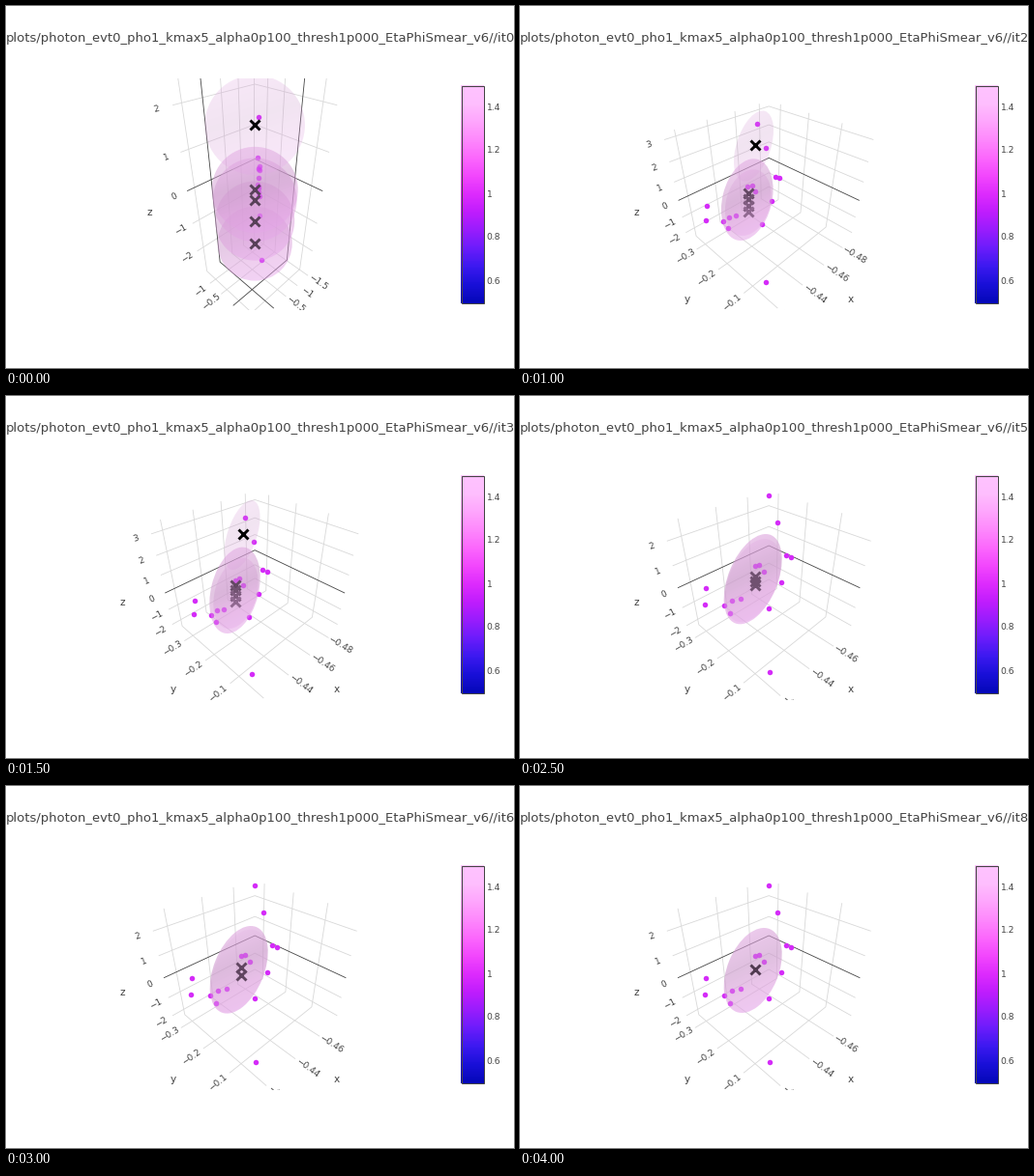
Recreate the animation shown at these times as a matplotlib script. Size 525 by 375 pixels, loop 4500 ms.

```python
from collections import namedtuple

import numpy as np
import matplotlib.pyplot as plt
from matplotlib.animation import FuncAnimation
from matplotlib.colors import LinearSegmentedColormap
from matplotlib.patches import Ellipse, Rectangle

W, H, DPI = 525, 375, 100
PX = 72 / DPI                       # points per pixel
INK, GRID, DOT = "#444444", "#d8d8d8", "#d42bf8"
PLUM = np.array([221, 160, 221]) / 255
LEFT, RIGHT, TOP, BOTTOM = 60, 454, 75, 315
CX, CY, FOCAL = 257.2, 195, 120 / np.tan(np.pi / 8)
EYE = 1.25 * 3 ** 0.5
STEPS = 9
TITLE = "plots/photon_evt0_pho1_kmax5_alpha0p100_thresh1p000_EtaPhiSmear_v6//it%d"

plt.rcParams["font.family"] = "DejaVu Sans"
BAR = LinearSegmentedColormap.from_list("bar", [
    "#0508b8", "#1910d8", "#3c19f0", "#6b1cfb", "#981cfd", "#bf1cfd", "#dd2bfd",
    "#f246fe", "#fc67fd", "#fe88fc", "#fea5fd", "#febefe", "#fec3fe"])
SHADE = LinearSegmentedColormap.from_list("shade", [
    (0, "#e2a8e2"), (0.42, "#cb97cb"), (0.72, "#dfa0df"), (1, "#e6a6ea")])


class Axis:
    """Ticks first, first + step, ... placed at start, start + gap, ..."""

    def __init__(self, first, step, count, start, gap):
        self.first, self.step, self.count = first, step, count
        self.start, self.gap = start, gap

    def place(self, value):
        return self.start + (value - self.first) / self.step * self.gap

    def value(self, place):
        return self.first + (place - self.start) / self.gap * self.step

    def ticks(self):
        for i in range(self.count):
            yield round(self.first + i * self.step, 3), self.start + i * self.gap


Scene = namedtuple("Scene", "half axes blobs marks")


def mix(a, b, u):
    return np.array(a) * (1 - u) + np.array(b) * u


def project(x, y, z):
    depth = EYE - (x + y + z) / 3 ** 0.5
    right = (y - x) / 2 ** 0.5
    up = (2 * z - x - y) / 6 ** 0.5
    return np.array([CX + FOCAL * right / depth, CY - FOCAL * up / depth])


def unproject(px, py, x):
    """Point of the plane x = const that is seen at (px, py)."""
    k = (px - CX) / FOCAL * 2 ** 0.5
    m = (py - CY) / FOCAL * 6 ** 0.5
    r = 3 ** 0.5
    depth = (EYE - r * x) / (1 - m / (2 * r) + k * r / 2)
    return x, x + k * depth, (2 * x + k * depth - m * depth) / 2


LATE_AXES = (Axis(-0.46, 0.02, 3, -0.25, 0.32), Axis(-0.3, 0.1, 3, -0.385, 0.315),
             Axis(-2, 1, 5, -0.436, 0.2015))


def cloud():
    seen = np.array([
        (257, 103), (266, 131), (274.5, 164.5), (279.5, 166.5), (269.5, 193), (191.7, 199),
        (191, 216.3), (211.5, 217), (219, 212), (227.5, 210.3), (217, 225), (256.5, 219.7),
        (242.5, 176.3), (247.5, 175), (251.5, 182), (258, 286.3)])
    px, py = seen.T
    depth = np.clip(0.0077 * (CX - px) + 0.004 * (py - 205), -0.44, 0.5)
    return [a.value(p) for a, p in zip(LATE_AXES, unproject(px, py, depth))]


def opening():
    """Unit spheres in equal scales, stacked along z."""
    s = 0.329
    axes = (Axis(-1.5, 0.5, 5, -0.357, s / 2), Axis(-1, 0.5, 4, -0.229, s / 2),
            Axis(-2, 1, 5, 0.032 - 2 * s, s))
    blobs, marks = [], []
    for z in (-1.72, -0.92, -0.26, 0.03, 1.6):
        c = axes[2].place(z)
        px, py = project(0, 0, c)
        r = s * FOCAL / (EYE - c / 3 ** 0.5)
        top = z > 1
        blobs.append((px, py, r, r, 0, 0.26 if top else 0.5))
        marks.append((px, py, 0 if top else 0.4))
    return Scene((0.365, 0.96), axes, blobs, marks)


def early(u):
    """One cluster on its own above four that nearly coincide."""
    axes = (Axis(-0.48, 0.02, 4, -0.384, 0.267),
            Axis(-0.3, 0.1, 3, *mix((-0.385, 0.315), (-0.335, 0.293), u)),
            Axis(-2, 1, 6, *mix((-0.379, 0.173), (-0.422, 0.1693), u)))
    x, y, w, h = mix((233, 200, 27.5, 40), (236.5, 201.3, 26.2, 44.7), u)
    blobs = [(*mix((239, 146, 22.5, 37), (244, 144, 18.5, 36), u), 18, 0.26),
             (x, y, w, h, 14, 0.55), (x + 1, y + 3, w - 3, h - 8, 16, 0.35)]
    mx, lo, hi = mix((235, 192, 213), (237.3, 195.5, 213.3), u)
    marks = [(mx, my, tone) for my, tone in zip(np.linspace(lo, hi, 4),
                                                np.linspace(0.45, 0.65, 4))]
    marks.append((*mix((240.5, 145.3), (245, 142.8), u), 0))
    return Scene((0.5, 0.5), LATE_AXES[:0] + axes, blobs, marks)


def late(u):
    """The clusters merge into one."""
    x, y, w, h = mix((240.7, 189, 30, 48), (240.7, 191, 30, 44), u)
    blobs = [(x, y, w, h, 22, 0.6), (x, y + 1.5, w - 1, 43, 23, 0.4 * (1 - u))]
    count = 1 + int(np.ceil(2 * (1 - u)))
    marks = [(242.5, my, 0.58 - 0.22 * u)
             for my in np.linspace(186 + 3.5 * u, 196.3, count)]
    return Scene((0.5, 0.5), LATE_AXES, blobs, marks)


def scene_at(i):
    if i == 0:
        return opening()
    if i < 4:
        return early((i - 1) / 2)
    return late(min((i - 4) / 3, 1))


def line(value, *corners):
    pts = np.array([project(*c) for c in corners])
    zero = value == 0
    ax.plot(*pts.T, color=INK if zero else GRID, lw=0.6, zorder=1.5 if zero else 1)


def put(text, pos, size, angle=0):
    ax.text(*pos, text, size=size * PX, color=INK, rotation=angle, ha="center",
            va="center", clip_on=True, zorder=2)


def label(value, edge, out):
    a, b = project(*edge), project(*out)
    angle = -np.degrees(np.arctan((b[1] - a[1]) / (b[0] - a[0])))
    put(f"{value:g}".replace("-", "\u2212"), b, 9, angle)


def draw_axes(scene):
    h, k = scene.half
    o, far = h + 0.115, h + 0.32
    xs, ys, zs = scene.axes
    for v, p in xs.ticks():
        line(v, (p, -h, k), (p, -h, -k), (p, h, -k))
        label(v, (p, h, -k), (p, o, -k))
    for v, p in ys.ticks():
        line(v, (-h, p, k), (-h, p, -k), (h, p, -k))
        label(v, (h, p, -k), (o, p, -k))
    for v, p in zs.ticks():
        line(v, (h, -h, p), (-h, -h, p), (-h, h, p))
        label(v, (h, -h, p), (o, -h, p))
    for name, at in zip("xyz", [(0, far, -k), (far, 0, -k), (far, -h, 0)]):
        put(name, project(*at), 10.5)


def draw_blob(cx, cy, w, h, tilt, alpha):
    """Shaded ellipse given by its half width and half height."""
    total, diff = w * w + h * h, (h * h - w * w) / np.cos(2 * np.radians(tilt))
    shape = Ellipse((cx, cy), np.sqrt(2 * (total - diff)), np.sqrt(2 * (total + diff)),
                    angle=tilt, fc="none", ec="none")
    v, u = np.mgrid[0:1:60j, -0.5:0.5:60j]
    img = ax.imshow(v + 0.3 * u, cmap=SHADE, vmin=0, vmax=1, alpha=alpha, aspect="auto",
                    extent=(cx - w - 1, cx + w + 1, cy + h + 1, cy - h - 1),
                    interpolation="bilinear", zorder=4)
    ax.add_patch(shape)
    img.set_clip_path(shape)


def update(i):
    scene = scene_at(i)
    title.set_text(TITLE % i)
    ax.cla()
    ax.axis("off")
    draw_axes(scene)
    dots = project(*[a.place(v) for a, v in zip(scene.axes, CLOUD)])
    # A faint second pass lets enclosed dots show through the surfaces.
    for alpha, z in ((1, 3), (0.3, 4.5)):
        ax.plot(*dots, "o", color=DOT, ms=5.4 * PX, mew=0, alpha=alpha, zorder=z)
    for blob in scene.blobs:
        draw_blob(*blob)
    for x, y, tone in scene.marks:
        ax.plot(x, y, "x", color=tone * PLUM, ms=9.5 * PX, mew=2.9 * PX, zorder=5)
    ax.set_xlim(LEFT, RIGHT)
    ax.set_ylim(BOTTOM, TOP)
    return []


def draw_bar():
    x0, x1, y0, y1 = 470.5, 493.5, 82.5, 307.5
    page.imshow(np.linspace(1, 0, 256)[:, None], cmap=BAR, aspect="auto",
                extent=(x0 - 0.5, x1 + 0.5, y1 + 0.5, y0 - 0.5), interpolation="bilinear")
    page.add_patch(Rectangle((x0, y0), x1 - x0, y1 - y0, fc="none", ec=INK, lw=PX))
    for v in (0.6, 0.8, 1, 1.2, 1.4):
        page.text(496.5, y1 - (v - 0.5) * (y1 - y0), f"{v:g}", size=9.2 * PX, color=INK,
                  ha="left", va="center")
    page.set_xlim(0, W)
    page.set_ylim(H, 0)


CLOUD = cloud()
fig = plt.figure(figsize=(W / DPI, H / DPI), dpi=DPI, facecolor="white")
page = fig.add_axes([0, 0, 1, 1])
page.axis("off")
draw_bar()
title = page.text(W / 2, 37, "", size=13.13 * PX, color=INK, ha="center", va="baseline")
ax = fig.add_axes([LEFT / W, 1 - BOTTOM / H, (RIGHT - LEFT) / W, (BOTTOM - TOP) / H])

anim = FuncAnimation(fig, update, frames=STEPS, init_func=lambda: [],
                     interval=500, repeat=True, blit=False)
plt.show()
```
